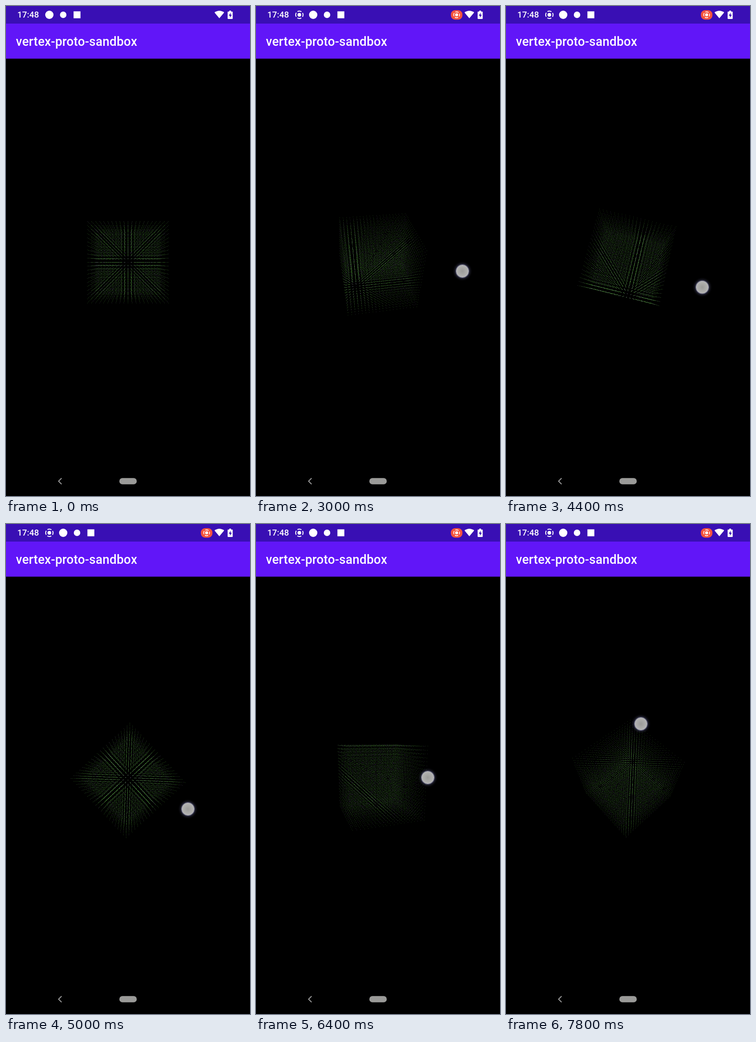
Recreate the animation shown at these times as an HTML page with a canvas. Size 529 by 1058 pixels, loop 8000 ms.

```html
<!DOCTYPE html>
<html lang="en">
<head>
<meta charset="utf-8">
<title>Point lattice</title>
<style>
  html, body { margin: 0; width: 100%; height: 100%; overflow: hidden; background: #000; }
  #stage { position: relative; width: 529px; height: 1058px; overflow: hidden; background: #000; }
  #stage > * { position: absolute; }
  #chrome { left: 0; top: 0; }
  #chrome text { font-family: Roboto, "Open Sans", sans-serif; font-weight: 500; fill: #fff; }
  #lattice { left: 104px; top: 393px; width: 320px; height: 320px; }
  #touch {
    left: -13.5px; top: -13.5px; width: 27px; height: 27px; border-radius: 50%;
    background: radial-gradient(circle closest-side, #9b9b99, #adadab 70%, #b6b6b8);
    box-shadow: 0 0 1px 1px rgba(150, 150, 190, .7), 0 0 5px 3px rgba(100, 100, 145, .45);
  }
</style>
</head>
<body>
<div id="stage">
  <svg id="chrome" width="529" height="1058" viewBox="0 0 529 1058">
    <defs>
      <g id="rec">
        <circle r="8" fill="none" stroke="#fff" stroke-width="2" stroke-dasharray="9 3.566" stroke-dashoffset="4.5"/>
        <circle r="4" fill="#fff"/>
      </g>
    </defs>
    <rect width="529" height="38" fill="#390fb4"/>
    <rect y="38" width="529" height="75.700" fill="#6116f8"/>
    <text x="24.5" y="25.3" font-size="18.5">17:48</text>
    <text x="21.5" y="86" font-size="27" letter-spacing=".2">vertex-proto-sandbox</text>
    <g id="icons" fill="#fff">
      <circle cx="94" cy="19" r="9"/>
      <circle cx="124" cy="19" r="7"/>
      <rect x="146.5" y="11.5" width="15" height="15"/>
    </g>
    <g id="recording">
      <use href="#rec" x="94" y="19"/>
      <rect x="422.5" y="9" width="25" height="20.5" rx="9" fill="#f4523c"/>
      <use href="#rec" transform="translate(435 19) scale(.8)"/>
    </g>
    <path d="M462.5 26.5 L452 14 Q462.5 6.500 473 14 Z" fill="#fff"/>
    <path d="M484 10h4v2h2.2q1.3 0 1.3 1.3v13.4q0 1.3-1.3 1.3h-8.4q-1.3 0-1.3-1.3V13.300q0-1.3 1.3-1.3H484z" fill="#fff"/>
    <path d="M487 14.500l-4 6.500h2.500v4.500l4-6.500H487z" fill="#390fb4"/>
    <path d="M120.500 1019.500L114 1026l6.500 6.500" fill="none" stroke="#999" stroke-width="2"/>
    <rect x="245.700" y="1019.3" width="37.8" height="13.4" rx="6.700" fill="#9a9a98"/>
  </svg>
  <canvas id="lattice" width="640" height="640"></canvas>
  <div id="touch"></div>
</div>
<script>
const LOOP = 8000, STEP = 200, REC_AT = 600, TOUCH_AT = 1800;
const N = 10, FOCAL = 880, DIST = 6;      // canvas is drawn at double density
const CX = 321, CY = 320;
const GREEN = '#74e650', LILAC = '#a596c4';

// time, finger x, finger y, pitch, yaw (degrees)
const keys = [
  [1800, 439, 538,    0,      0],
  [3000, 447, 572,   38.5,    8.5],
  [3800, 449, 592,   63,     12],
  [5000, 394, 615,   90.5,  -47],
  [6400, 372, 547,   11,    -71],
  [7800, 292, 431, -120,   -132.5]
];

const byId = id => document.getElementById(id);
const icons = byId('icons'), recording = byId('recording'), touch = byId('touch');
const ctx = byId('lattice').getContext('2d');

// the lattice points, about a quarter of them tinted lilac
const points = [];
let seed = 7;
for (let i = -N; i <= N; i++)
  for (let j = -N; j <= N; j++)
    for (let k = -N; k <= N; k++) {
      seed = (Math.imul(seed, 1664525) + 1013904223) >>> 0;
      points.push({ x: i / N, y: j / N, z: k / N, lilac: seed / 2 ** 32 < .25 });
    }
points.sort((a, b) => a.lilac - b.lilac);

const slope = (i, c) => (keys[i + 1][c] - keys[i][c]) / (keys[i + 1][0] - keys[i][0]);

// tangent that never overshoots the keys
function tangent(i, c) {
  if (i === 0) return slope(0, c);
  if (i === keys.length - 1) return slope(i - 1, c);
  const a = slope(i - 1, c), b = slope(i, c);
  return a * b <= 0 ? 0 : 2 * a * b / (a + b);
}

function valueAt(t, c) {
  if (t <= keys[0][0]) return keys[0][c];
  let i = 0;
  while (i < keys.length - 2 && t > keys[i + 1][0]) i++;
  const [a, b] = [keys[i], keys[i + 1]];
  const span = b[0] - a[0], u = Math.min(1, (t - a[0]) / span), v = 1 - u;
  return a[c] * (1 + 2 * u) * v * v + b[c] * u * u * (3 - 2 * u)
    + span * u * v * (tangent(i, c) * v - tangent(i + 1, c) * u);
}

function drawLattice(pitch, yaw) {
  const rad = Math.PI / 180;
  const sp = Math.sin(pitch * rad), cp = Math.cos(pitch * rad);
  const sy = Math.sin(yaw * rad), cy = Math.cos(yaw * rad);
  ctx.clearRect(0, 0, 640, 640);
  for (const p of points) {
    const x = p.x * cy + p.z * sy, d = p.z * cy - p.x * sy;
    const y = p.y * cp - d * sp, z = p.y * sp + d * cp;
    const s = FOCAL / (DIST - z);
    ctx.fillStyle = p.lilac ? LILAC : GREEN;
    ctx.fillRect(Math.floor(CX + x * s), Math.floor(CY - y * s), 1, 1);
  }
}

let shown = -1;
function render(time) {
  const t = Math.floor(time % LOOP / STEP) * STEP;
  if (t === shown) return;
  shown = t;
  const rec = t >= REC_AT;
  icons.setAttribute('transform', `translate(${rec ? 30 : 0} 0)`);
  recording.style.display = rec ? '' : 'none';
  touch.style.display = t >= TOUCH_AT ? '' : 'none';
  touch.style.transform = `translate(${valueAt(t, 1)}px, ${valueAt(t, 2)}px)`;
  drawLattice(valueAt(t, 3), valueAt(t, 4));
}

const start = performance.now();
function tick() {
  render(performance.now() - start);
  requestAnimationFrame(tick);
}
tick();
</script>
</body>
</html>
```
